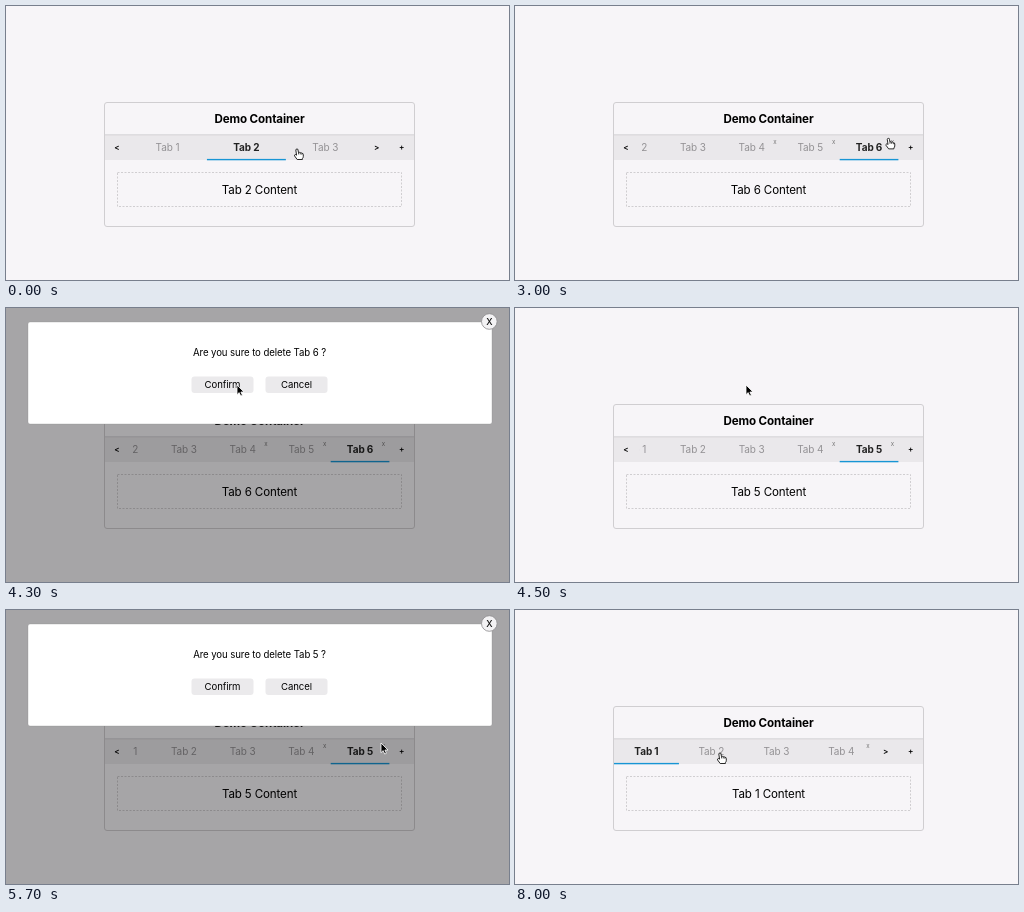
Write an HTML page that moves like this. It is 503 px wide and 274 px high and loops after 8200 ms.

```html
<!DOCTYPE html>
<html lang="en">
<head>
<meta charset="utf-8">
<title>Tabs demo</title>
<style>
html, body { margin: 0; width: 100%; height: 100%; overflow: hidden; background: #f7f5f8; }
svg { display: block; width: 503px; height: 274px; }
text { font-family: Inter, "Liberation Sans", sans-serif; text-anchor: middle; letter-spacing: -.01em; }
</style>
</head>
<body>
<svg id="stage" viewBox="0 0 503 274"></svg>
<script>
const LOOP = 8200, STEP = 100;
const NAV = { left: 99, right: 408, prev: 23, button: 24.6, top: 129, bottom: 154, minTab: 58.7 };
const CENTER = 253.5;

const smooth = k => k * k * (3 - 2 * k);
const overshoot = k => 1 + 2.7 * (k - 1) ** 3 + 1.7 * (k - 1) ** 2;

// The session is a log of interface states and pointer moves.
const states = [{ at: 0, count: 3, active: 2, dialog: false }];
const moves = [];
let pointer = { x: 291, y: 143 };

const latest = () => states[states.length - 1];
const change = (at, patch) => states.push({ ...latest(), ...patch, at });

function move(at, until, x, y, ease = smooth) {
  moves.push({ at, until, from: pointer, to: { x, y }, ease });
  pointer = { x, y };
}

function addTab(at) {
  const count = latest().count + 1;
  change(at, { count, active: count });
}

function removeTab(opens, closes, x, y) {
  move(opens - 900, opens - 300, 375, 133, overshoot);
  change(opens, { dialog: true });
  move(opens, closes - 200, x, y);
  const count = latest().count - 1;
  change(closes, { count, active: count, dialog: false });
}

move(0, 200, 325, 143);
change(400, { active: 3 });
move(400, 1200, 392.5, 140);
addTab(1600);
addTab(2700);
addTab(2800);
removeTab(3600, 4500, 231, 77);
removeTab(5700, 6400, 207.5, 75);
move(6400, 7200, 109.5, 139.5);
move(7200, 7500, 150, 144);
change(7700, { active: 1 });
move(7700, 8000, 205, 143);

const lastBefore = (log, t) => log.filter(entry => entry.at <= t).pop();

function pointerAt(t) {
  const { at, until, from, to, ease } = lastBefore(moves, t);
  const e = ease(Math.min(1, (t - at) / (until - at)));
  return { x: from.x + (to.x - from.x) * e, y: from.y + (to.y - from.y) * e };
}

const rect = (x, y, w, h, attrs = '') => `<rect x="${x}" y="${y}" width="${w}" height="${h}" ${attrs}/>`;
const text = (label, x, y, size, fill = '#000', weight = 400) =>
  `<text x="${x}" y="${y}" font-size="${size}" fill="${fill}" font-weight="${weight}">${label}</text>`;

// Scroll buttons appear only when there is a tab to go to on that side.
function layout({ count, active }) {
  const left = NAV.left + (active > 1 ? NAV.prev : 0);
  const right = NAV.right - NAV.button * (active < count ? 2 : 1);
  const width = Math.max(NAV.minTab, (right - left) / count);
  return { left, right, width, start: right - width * count };
}

function drawTabs({ count, active }, box) {
  const sign = (label, x) => text(label, x, 144, 8, '#000', 600);
  let tabs = '';
  for (let n = 1; n <= count; n++) {
    const x = box.start + (n - 1) * box.width, on = n === active;
    tabs += text('Tab ' + n, x + box.width / 2, 145, 10, on ? '#222' : '#949295', on ? 700 : 400);
    if (n > 3) tabs += text('x', x + box.width - 6, 137.8, 6.2, '#777');
    if (on) tabs += rect(x, 152.9, box.width, 1.4, 'fill="#1795d4"');
  }
  return `<clipPath id="strip">${rect(box.left + (active > 1 ? 2.5 : 0), NAV.top, box.right - box.left, 26)}</clipPath>
    <g clip-path="url(#strip)">${tabs}</g>`
    + (active > 1 ? sign('&lt;', 111) : '')
    + (active < count ? sign('&gt;', 370.7) : '')
    + sign('+', 395.7);
}

function drawPanel(state, box) {
  return rect(98.5, 96.5, 310, 124, 'rx="2.5" fill="#f7f5f8" stroke="#d0ced1"')
    + text('Demo Container', CENTER, 117.2, 11.6, '#000', 700)
    + rect(NAV.left, NAV.top, 309, 25, 'fill="#eae8eb"')
    + rect(NAV.left, 128.4, 309, .9, 'fill="#d0ced1"')
    + drawTabs(state, box)
    + rect(111.5, 166.5, 284, 34, 'fill="none" stroke="#d0ced1" stroke-dasharray="2 1.5"')
    + text(`Tab ${state.active} Content`, CENTER, 188.3, 11.55);
}

function drawDialog(tab) {
  const button = (label, x) => rect(x, 68.5, 62, 16.5, 'rx="3" fill="#ebeaec"') + text(label, x + 31, 80.4, 9.6);
  return rect(0, 0, 503, 274, 'fill-opacity=".33"')
    + rect(22, 14, 464, 102, 'rx="2" fill="#fff" stroke="#888" stroke-opacity=".5" stroke-width=".6"')
    + text(`Are you sure to delete Tab ${tab} ?`, CENTER, 48, 9.65)
    + button('Confirm', 185.5) + button('Cancel', 259.5)
    + '<circle cx="483.3" cy="13.5" r="7.8" fill="#f3f2f4" stroke="#8c8b8d" stroke-width=".8"/>'
    + text('X', 483.3, 16.9, 9, '#111', 500);
}

const ARROW = '<path d="M0 0V9.7L2.2 7.6L3.7 11L5.4 10.3L3.9 7H7Z" stroke="#fff" stroke-width=".8" stroke-linejoin="round"/>';
const HAND = `<g stroke="#111" stroke-width=".9" stroke-linejoin="round">
  <path d="M-1.2 1Q-1.2 0 0 0T1 1L1.5 3.6Q2.5 3 3.2 3.8Q4.2 3.3 4.9 4.3Q6.2 4.1 6.3 5.6V7.6Q6.2 8.8 5.4 9.6V10.5H.2L-2.4 7Q-2.9 6 -2 5.6T-.4 6.2Z" fill="#fff"/>
  <path d="M1.5 3.6V5.4M3.2 3.8V5.5M4.9 4.4V5.8" stroke-width=".7"/></g>`;

function drawPointer({ x, y }, box, blocked) {
  const overTabs = y > NAV.top && y < NAV.bottom && x > box.left && x < box.right;
  const overClose = x > 374 && x < 381 && y < 139;
  const look = overTabs && !overClose && !blocked ? HAND : ARROW;
  return `<g transform="translate(${x} ${y})">${look}</g>`;
}

function render(t) {
  const state = lastBefore(states, t), box = layout(state);
  stage.innerHTML = rect(0, 0, 503, 274, 'fill="#f7f5f8"')
    + drawPanel(state, box)
    + (state.dialog ? drawDialog(state.active) : '')
    + drawPointer(pointerAt(t), box, state.dialog);
}

const stage = document.getElementById('stage');
const origin = performance.now();
let shown = -1;
function tick() {
  const t = Math.floor((performance.now() - origin) % LOOP / STEP) * STEP;
  if (t !== shown) render(shown = t);
  requestAnimationFrame(tick);
}
tick();
</script>
</body>
</html>
```
